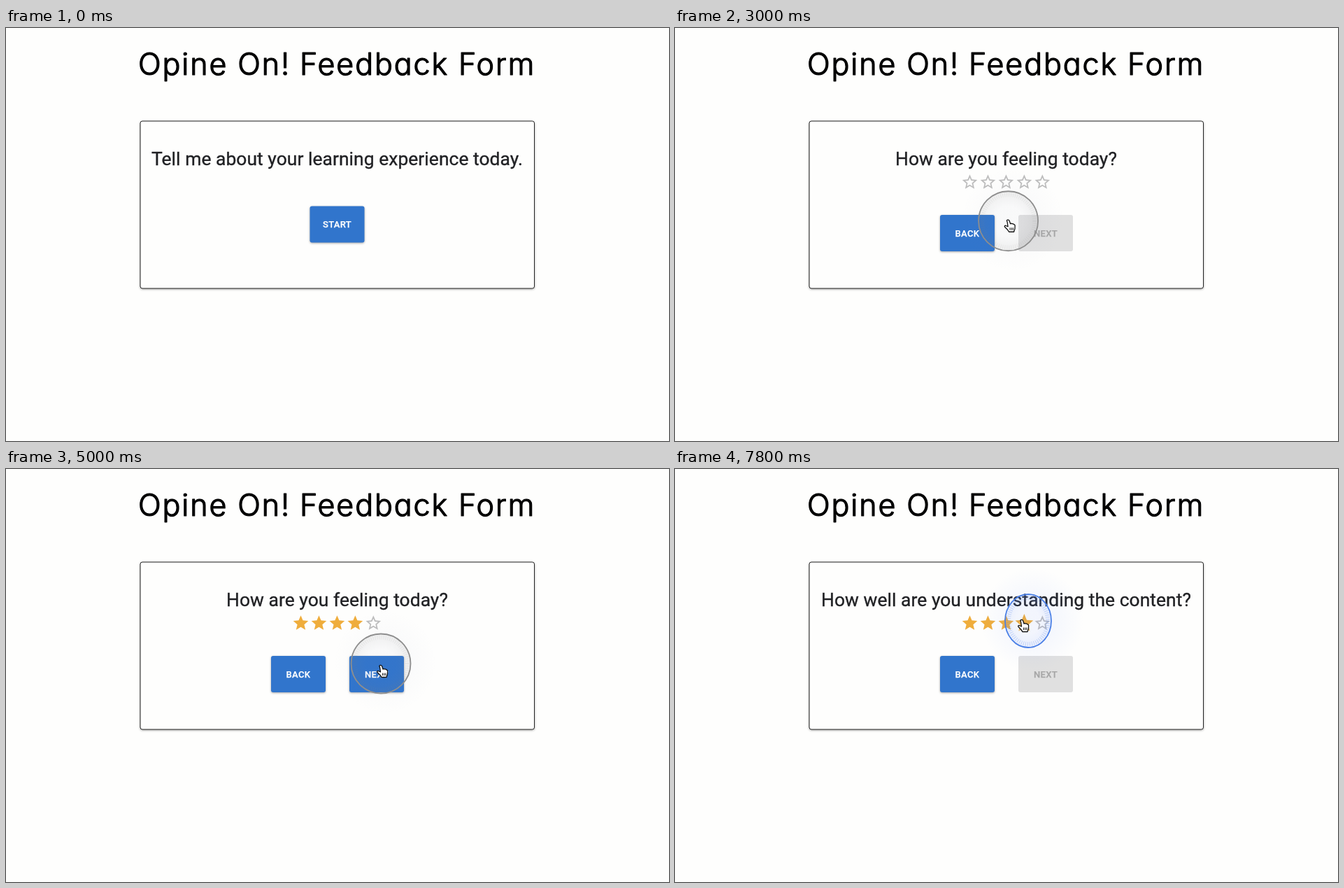
Recreate the animation shown at these times as an HTML page. Size 948 by 590 pixels, loop 8 s.

```html
<!DOCTYPE html>
<html lang="en">
<head>
<meta charset="utf-8">
<title>Feedback form</title>
<style>
  html, body { margin: 0; width: 100%; height: 100%; overflow: hidden; background: #fefefd; }
  svg { display: block; width: 948px; height: 590px; }
  .title { font: 300 43px Inter, sans-serif; font-feature-settings: "cv11"; letter-spacing: 1.9px; stroke: #000; stroke-width: 1.2; stroke-linejoin: round; }
  .question { font: 400 26.4px Roboto, sans-serif; letter-spacing: .06px; fill: #202124; stroke: #202124; stroke-width: .35; text-anchor: middle; }
  .button text { font: 500 13px Roboto, sans-serif; letter-spacing: .37px; stroke-width: .25; text-anchor: middle; }
  .raised { filter: drop-shadow(0 1.5px 1.5px rgba(0, 0, 0, .35)); }
</style>
</head>
<body>
<svg viewBox="0 0 948 590">
  <defs>
    <radialGradient id="greyHalo">
      <stop offset=".4" stop-color="#6670a8" stop-opacity=".03"/>
      <stop offset="1" stop-color="#6670a8" stop-opacity="0"/>
    </radialGradient>
    <radialGradient id="blueHalo">
      <stop offset=".3" stop-color="#5b82ff" stop-opacity=".07"/>
      <stop offset="1" stop-color="#5b82ff" stop-opacity="0"/>
    </radialGradient>
    <radialGradient id="greyLens">
      <stop offset=".5" stop-color="#888" stop-opacity=".01"/>
      <stop offset="1" stop-color="#777" stop-opacity=".1"/>
    </radialGradient>
    <radialGradient id="blueLens">
      <stop offset=".5" stop-color="#6f96ff" stop-opacity="0"/>
      <stop offset="1" stop-color="#6f96ff" stop-opacity=".1"/>
    </radialGradient>
  </defs>
  <text class="title" y="67"><tspan x="189">Opine On!</tspan><tspan x="420">Feedback Form</tspan></text>
  <rect class="raised" x="192" y="133" width="563.5" height="239" rx="3" fill="#fefefd" stroke="#242424"/>
  <g id="page"></g>
  <g id="pointer"></g>
</svg>
<script>
const LOOP = 8000, STEP = 200;
const page = document.getElementById('page');
const pointer = document.getElementById('pointer');

// time, x, y, distance the cursor runs ahead of its ring
const path = [
  [200, 750, 365, 0], [1000, 531, 305, 0], [1600, 475, 280, 0], [2800, 475, 280, 0],
  [3800, 490, 239, 0], [4200, 496, 217, 0], [4600, 496, 217, 0], [5000, 536, 278, 4],
  [5400, 528, 289, 0], [6400, 528, 289, 0], [7400, 496, 217, 0], [8000, 496, 217, 0]
];
const clicks = [2200, 4400, 5400, 7800];

const FULL_STAR = 'M12 17.27L18.18 21l-1.64-7.03L22 9.24l-7.19-.61L12 2 9.19 8.63 2 9.24l5.46 4.73L5.82 21z';
const STAR_HOLE = 'M12 15.4l-3.76 2.27 1-4.28-3.32-2.88 4.38-.38L12 6.1l1.71 4.04 4.38.38-3.32 2.88 1 4.28z';
const ARROW = 'M-3-2V11.5L.2 8.6 2.6 14 5 13 2.6 7.8H7Z';
const HAND = 'M-1.5 1Q-3-1-1-1.5Q1-2 1.7 0L3 4Q4 3 5.5 4Q7 3.5 8 5Q9.5 4.8 9.6 7L9.4 11 8 15.5H1L-1.5 12-5 8.5Q-6 6.5-3.8 6.5L-.5 8Z';

function position(t) {
  const i = Math.max(1, path.findIndex(key => key[0] >= t));
  const [a, b] = [path[i - 1], path[i]];
  const u = (t - a[0]) / (b[0] - a[0]);
  const eased = u * u * (3 - 2 * u);
  return [1, 2, 3].map(k => a[k] + (b[k] - a[k]) * eased);
}

function button(label, x, y, state) {
  const fill = { normal: '#3175cc', hover: '#2965b9', disabled: '#e0e0e0' }[state];
  const off = state === 'disabled';
  const ink = off ? '#a6a6a6' : '#fff';
  return `<g class="button"><rect class="${off ? '' : 'raised'}" x="${x}" y="${y}" width="78" height="52" rx="3" fill="${fill}"/>
    <text x="${x + 39}" y="${y + 30.5}" fill="${ink}" stroke="${ink}">${label}</text></g>`;
}

function stars(count, hovered) {
  return Array.from({ length: 5 }, (_, i) => {
    const full = i < count;
    const scale = hovered && i === count - 1 ? 1.29 : 1.08;
    return `<path transform="translate(${421.5 + 25.95 * i} 220) scale(${scale}) translate(-12 -12)"
      d="${FULL_STAR}${full ? '' : STAR_HOLE}" fill="${full ? '#efad3c' : '#bdbdbd'}" fill-rule="evenodd"/>`;
  }).join('');
}

const question = text => `<text class="question" x="473.5" y="196">${text}</text>`;

function drawPage(t, x, y) {
  if (t < 2400) {
    const over = t > 1000 && x < 512;
    return question('Tell me about your learning experience today.') +
      button('START', 434.5, 254.5, over ? 'hover' : 'normal');
  }
  const second = t >= 5600;
  const overStars = t > 3800 && y < 231;
  const rated = t >= 4600 && !second;
  const overNext = t > 5000 && y > 266;
  return question(second ? 'How well are you understanding the content?' : 'How are you feeling today?') +
    stars(overStars || rated ? 4 : 0, overStars) +
    button('BACK', 379, 267, 'normal') +
    button('NEXT', 491, 267, !rated ? 'disabled' : overNext ? 'hover' : 'normal');
}

function drawPointer(t, x, y, lead) {
  const click = clicks.includes(t);
  const [tone, color, cx, rx, ry] = click ? ['blue', '#4b80e6', 9, 33, 38] : ['grey', '#8e8e8e', 0, 42.5, 42.5];
  const cursor = t < 1400
    ? `<path d="${ARROW}" fill="#000" stroke="#fff" stroke-width="1.4" paint-order="stroke"/>`
    : `<path d="${HAND}" fill="#fff" stroke="#111" stroke-width="1.3" stroke-linejoin="round"/>
       <path d="M2.5 9.5V13M4.7 9.5V13M6.8 9.5V13" stroke="#111"/>`;
  return `<g transform="translate(${x} ${y})">
    <circle cx="${cx + 6}" cy="-2" r="74" fill="url(#${tone}Halo)"/>
    <ellipse cx="${cx}" rx="${rx}" ry="${ry}" fill="url(#${tone}Lens)" stroke="${color}" stroke-width="1.8"/>
    <ellipse cx="${cx}" rx="${rx - 5}" ry="${ry - 5}" fill="none" stroke="${color}" stroke-width="6"
      stroke-dasharray="1 2" opacity="${click ? .25 : .1}"/>
    <g transform="translate(0 ${lead})">${cursor}</g></g>`;
}

let shown = -1;
function frame() {
  const t = Math.floor(performance.now() % LOOP / STEP) * STEP;
  if (t !== shown) {
    shown = t;
    const [x, y, lead] = position(t);
    page.innerHTML = drawPage(t, x, y);
    pointer.innerHTML = t < path[0][0] ? '' : drawPointer(t, x, y, lead);
  }
  requestAnimationFrame(frame);
}
frame();
</script>
</body>
</html>
```
